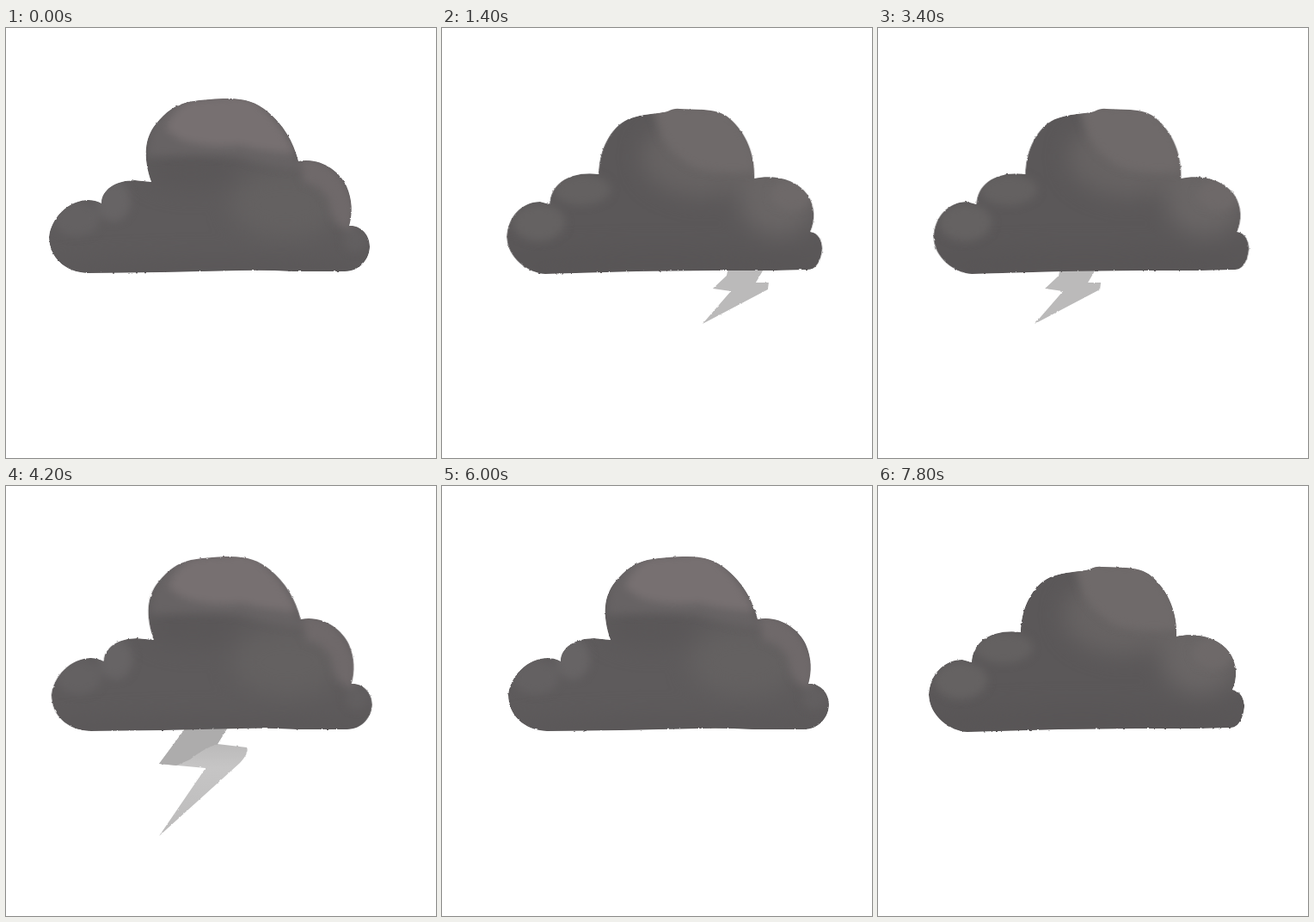
An HTML page that plays this animation: 500x500 px, repeating every 8.01 s.

```html
<!DOCTYPE html>
<html lang="en">
<head>
<meta charset="utf-8">
<title>Storm cloud</title>
<style>
  html, body { margin: 0; width: 100%; height: 100%; overflow: hidden; background: #fff; }
  svg { display: block; width: 100vw; height: 100vh; }
</style>
</head>
<body>
<svg viewBox="0 0 500 500">
  <defs>
    <filter id="rough" filterUnits="userSpaceOnUse" x="0" y="0" width="500" height="500" color-interpolation-filters="sRGB">
      <feTurbulence id="grain" type="fractalNoise" baseFrequency=".25" numOctaves="2"/>
      <feDisplacementMap in="SourceGraphic" scale="2.2" xChannelSelector="R" yChannelSelector="G"/>
    </filter>
    <filter id="soft" x="-40%" y="-40%" width="180%" height="180%" color-interpolation-filters="sRGB">
      <feGaussianBlur stdDeviation="5"/>
    </filter>
    <filter id="wide" x="-50%" y="-50%" width="200%" height="200%" color-interpolation-filters="sRGB">
      <feGaussianBlur stdDeviation="13"/>
    </filter>
    <path id="tallShape" d="M50 243C52 222 72 200 96 200Q104 200 111 204C111 188 128 177 150 177L169 179C159 150 161 128 174 112C186 97 196 90 212 86C230 83 245 82 258 82C278 82 292 87 304 97C322 112 334 131 340 155C366 150 388 167 396 184C403 200 403 216 399 230C412 229 423 240 423 254C423 268 412 283 394 283L335 283Q300 281 270 282L180 284L95 285C68 284 50 266 50 243Z"/>
    <path id="wideShape" d="M59 243C60 220 76 202 98 202L109 205C110 180 134 166 166 170C166 142 180 115 200 106C218 99 236 100 246 97Q254 93 260 94L288 95C300 96 310 98 318 105C338 122 348 148 347 175C370 170 396 176 409 194C418 208 418 224 412 237C422 238 426 248 426 257C425 268 420 281 410 281L370 282L300 282L210 283L104 286C84 285 60 268 59 243Z"/>
    <clipPath id="tallClip"><use href="#tallShape"/></clipPath>
    <clipPath id="wideClip"><use href="#wideShape"/></clipPath>
    <linearGradient id="flash" x1="0" y1="0" x2="0" y2="1">
      <stop offset="0" stop-color="#b0afaf"/>
      <stop offset=".4" stop-color="#c6c5c5"/>
      <stop offset="1" stop-color="#bcbbbb"/>
    </linearGradient>
  </defs>
  <g filter="url(#rough)">
    <g id="cloud">
      <g id="bolt">
        <g id="big">
          <path fill="url(#flash)" d="M207 274L262 274L246 300L280 304Q283 310 272 322L178 407L232 328L178 323L207 284Z"/>
          <path fill="#adacac" d="M207 274L262 274L246 300Q230 305 214 318L198 325L178 323L207 284Z"/>
        </g>
        <g id="small">
          <path fill="#bbbaba" d="M315 274L359 274L346 296L361 296L360 304L284 344L317 306L296 303L312 288Z"/>
        </g>
      </g>
      <g id="tall" clip-path="url(#tallClip)">
        <use href="#tallShape" fill="#5e5b5c"/>
        <g filter="url(#wide)">
          <ellipse cx="215" cy="165" rx="55" ry="22" fill="#5a5758"/>
          <ellipse cx="325" cy="205" rx="65" ry="40" fill="#646161"/>
          <ellipse cx="240" cy="284" rx="190" ry="16" fill="#5a5758"/>
        </g>
        <g filter="url(#soft)">
          <path fill="#676364" d="M165 150Q162 105 200 82L290 78L345 165Q310 164 270 150Q215 146 165 150Z"/>
          <path fill="#777071" d="M186 118Q192 92 220 82L270 78Q310 85 338 146Q300 144 272 136Q235 140 203 130Z"/>
          <path fill="#6f696a" d="M342 150Q390 150 406 210L402 240L388 230Q378 224 375 200Q364 182 346 180Z"/>
          <ellipse cx="82" cy="222" rx="27" ry="20" fill="#646162"/>
          <ellipse cx="125" cy="201" rx="20" ry="24" fill="#676465"/>
          <ellipse cx="406" cy="246" rx="14" ry="14" fill="#625f60"/>
        </g>
      </g>
      <g id="wideCloud" transform="translate(-2.7)">
        <g clip-path="url(#wideClip)">
          <use href="#wideShape" fill="#5b5859"/>
          <g filter="url(#wide)">
            <ellipse cx="285" cy="150" rx="70" ry="46" fill="#676363"/>
            <ellipse cx="375" cy="200" rx="46" ry="42" fill="#6a6666"/>
            <ellipse cx="235" cy="276" rx="190" ry="18" fill="#585556"/>
          </g>
          <g filter="url(#soft)">
            <path fill="#6f6a6a" d="M226 88L310 92Q345 120 350 166Q310 172 276 162Q248 146 238 124Z"/>
            <ellipse cx="96" cy="226" rx="31" ry="22" fill="#656262"/>
            <ellipse cx="146" cy="188" rx="34" ry="18" fill="#646161"/>
            <ellipse cx="390" cy="194" rx="24" ry="18" fill="#6e6969"/>
          </g>
        </g>
      </g>
    </g>
  </g>
</svg>
<script>
  const LOOP = 8010, STEP = 200, LAST = 39;
  const $ = id => document.getElementById(id);
  const show = (id, on) => $(id).setAttribute('display', on ? 'inline' : 'none');

  // step within the 20-step sway: [shape, shift x, stretch y]
  const strikes = {
    1: ['big', 0, 1], 2: ['big', 0, 1.055],
    6: ['big', 105, 1.06], 7: ['small', 0, 1],
    12: ['big', 45, 1.06], 13: ['big', 45, 1.075],
    17: ['small', -110, 1]
  };
  const TOP = 280;
  let shown = -1;

  function draw(step) {
    const sway = step % 20;
    const shift = 2.7 * (10 - Math.abs(sway - 10));
    const tall = step % 10 < 5;
    const [shape, dx, sy] = strikes[sway] || ['', 0, 1];

    $('cloud').setAttribute('transform', `translate(${50 - 50 + shift})`);
    $('bolt').setAttribute('transform', `translate(${dx - 2.7 * (shape === 'big')} ${TOP * (1 - sy)}) scale(1 ${sy})`);
    $('grain').setAttribute('seed', step + 1);
    show('tall', tall);
    show('wideCloud', !tall);
    show('big', shape === 'big');
    show('small', shape === 'small');
  }

  function tick() {
    const step = Math.min(LAST, Math.floor(performance.now() % LOOP / STEP));
    if (step !== shown) draw(shown = step);
    requestAnimationFrame(tick);
  }
  tick();
</script>
</body>
</html>
```
